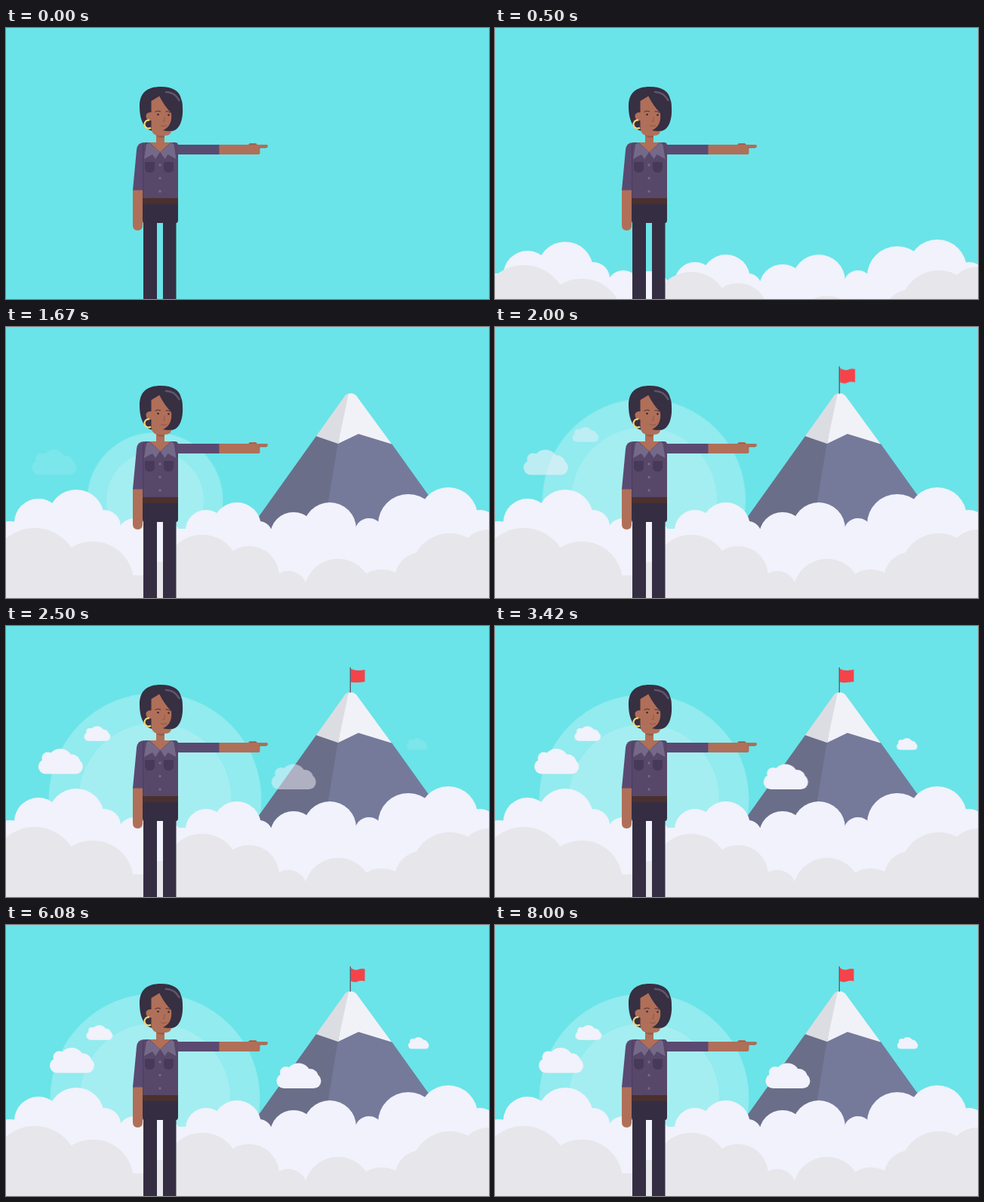
Animation, 640 px wide and 360 px high, one loop 8080 ms. Source, as an HTML page without scripts:

```html
<!DOCTYPE html>
<html lang="en">
<head>
<meta charset="utf-8">
<title>Pointing at the summit</title>
<style>
  html, body { margin: 0; width: 100%; height: 100%; overflow: hidden; background: #6ae4e8; }
  svg { display: block; width: 640px; height: 360px; }

  .sun, .mountain, .flag, .bank, .drift, .fade {
    animation: 8.08s linear infinite both;
  }

  .sun { transform-origin: 197.5px 230px; animation-name: sun; }
  @keyframes sun {
    0%, 17.6% { transform: scale(0); }
    20.67% { transform: scale(.646); animation-timing-function: ease-out; }
    26.6% { transform: scale(1.02); }
    30.94% { transform: scale(1.014); animation-timing-function: ease-out; }
    38.4%, 100% { transform: none; }
  }

  .mountain { animation-name: mountain; }
  @keyframes mountain {
    0%, 7.2% { transform: translateY(291px); animation-timing-function: cubic-bezier(.215, .61, .355, 1); }
    17.45%, 100% { transform: none; }
  }

  .flag { transform-origin: 456px 88px; animation-name: flag; }
  @keyframes flag {
    0%, 21.2% { transform: scale(0); animation-timing-function: ease-out; }
    25% { transform: scale(1.09); animation-timing-function: ease-in-out; }
    28.8%, 100% { transform: none; }
  }

  .bank { animation-name: rise; }
  .front { animation-name: rise-front; }
  @keyframes rise {
    0%, 4.9% { transform: translateY(150px); animation-timing-function: cubic-bezier(.215, .61, .355, 1); }
    10.8%, 100% { transform: none; }
  }
  @keyframes rise-front {
    0%, 4.9% { transform: translateY(100px); animation-timing-function: cubic-bezier(.215, .61, .355, 1); }
    11.2%, 100% { transform: none; }
  }

  .drift { animation-name: drift; }
  @keyframes drift {
    0%, 19.55% { transform: translateX(var(--from)); }
    49.5%, 100% { transform: none; }
  }

  .fade { animation-name: var(--fade); }
  @keyframes fade-left { 0%, 19.55% { opacity: 0; } 28%, 100% { opacity: 1; } }
  @keyframes fade-small { 0%, 21.7% { opacity: 0; } 28.5%, 100% { opacity: 1; } }
  @keyframes fade-peak { 0%, 28.8% { opacity: 0; } 33%, 100% { opacity: 1; } }
  @keyframes fade-right { 0%, 29.9% { opacity: 0; } 37%, 100% { opacity: 1; } }

  .white { fill: #f1f2fb; }
  .grey { fill: #e6e6eb; }
  .skin { fill: #b06f58; }
  .hair { fill: #372f42; }
  .shirt { fill: #574768; }
  .sleeve { fill: #5a4a71; }
  .pants { fill: #352e43; }
  .collar { fill: #75698a; }
  .pocket { fill: #473a58; }
</style>
</head>
<body>
<svg viewBox="0 0 640 360">
  <defs>
    <g id="cloud" class="white">
      <rect y="14" width="59" height="19.500" rx="9.750"/>
      <circle cx="12.500" cy="12.500" r="8"/>
      <circle cx="29" cy="16.500" r="16.500"/>
      <circle cx="44" cy="19" r="11.500"/>
    </g>
    <path id="half-collar" class="collar" d="M186 155L183 174L194 168L198 174L204 165L189 152Z"/>
    <path id="pocket" class="pocket" d="M184 178H197V187Q196 192 190.500 192Q185 192 184 187Z"/>
  </defs>

  <rect width="640" height="360" fill="#6ae4e8"/>

  <g class="sun" fill="#fff">
    <circle cx="197.500" cy="230" r="139" fill-opacity=".27"/>
    <circle cx="197.500" cy="230" r="99.500" fill-opacity=".17"/>
  </g>

  <g class="mountain">
    <path fill="#6b6e89" d="M411 145L457 138L480 360H322V270Z"/>
    <path fill="#757a9b" d="M440 153L467 138L511 155L593 270V360H410L424 250Z"/>
    <path fill="#f1f2f8" d="M450 91Q457 85 464 91L511 155.500L467 142L440 155Z"/>
    <path fill="#dcdde2" d="M411 145L448 93Q450 89 454 88.500L440 155Z"/>
  </g>

  <g class="flag">
    <path stroke="#5b586a" stroke-width="1.300" d="M456.300 55V88.500"/>
    <path fill="#f5434a" d="M457 57Q462 61 467 59T475.500 58.500V74.500Q470 73 466 75T457 74.500Z">
      <animate attributeName="d" dur="1.010s" repeatCount="indefinite" values="
        M457 57Q462 61 467 59T475.500 58.500V74.500Q470 73 466 75T457 74.500Z;
        M457 57Q462 59 467 59T475.500 58V74Q470 75 466 75T457 74.500Z;
        M457 57Q462 61 467 59T475.500 58.500V74.500Q470 73 466 75T457 74.500Z"/>
    </path>
  </g>

  <g class="drift" style="--from: -24.5px">
    <g class="fade" style="--fade: fade-left"><use href="#cloud" x="58" y="163"/></g>
  </g>
  <g class="drift" style="--from: -4.8px">
    <g class="fade" style="--fade: fade-small"><use href="#cloud" transform="translate(106.500 133) scale(.59)"/></g>
  </g>
  <g class="drift" style="--from: -11px">
    <g class="fade" style="--fade: fade-peak"><use href="#cloud" x="358.500" y="183.500"/></g>
  </g>
  <g class="drift" style="--from: -3.2px">
    <g class="fade" style="--fade: fade-right"><use href="#cloud" transform="translate(533 149) scale(.465)"/></g>
  </g>

  <g class="bank white">
    <rect y="268" width="640" height="260"/>
    <circle cx="5" cy="288" r="30"/>
    <circle cx="43" cy="260" r="32"/>
    <circle cx="93" cy="253" r="37"/>
    <circle cx="130" cy="265" r="22"/>
    <circle cx="170" cy="276" r="22"/>
    <circle cx="204" cy="285" r="30"/>
    <circle cx="265" cy="270" r="27"/>
    <circle cx="306" cy="265" r="32"/>
    <circle cx="335" cy="276" r="18"/>
    <circle cx="381" cy="277" r="31"/>
    <circle cx="429" cy="268" r="35"/>
    <circle cx="481" cy="273" r="19"/>
    <circle cx="533" cy="262" r="40"/>
    <circle cx="586" cy="252" r="39"/>
    <circle cx="628" cy="268" r="25"/>
  </g>

  <g class="bank front grey">
    <rect y="345" width="640" height="150"/>
    <rect y="330" width="230" height="30"/>
    <rect x="520" y="325" width="120" height="35"/>
    <circle cx="38" cy="325" r="58"/>
    <circle cx="115" cy="339" r="54"/>
    <circle cx="206" cy="335" r="23"/>
    <circle cx="260" cy="326" r="50"/>
    <circle cx="322" cy="331" r="40"/>
    <circle cx="374" cy="349" r="25"/>
    <circle cx="440" cy="353" r="45"/>
    <circle cx="498" cy="362" r="40"/>
    <circle cx="551" cy="335" r="36"/>
    <circle cx="588" cy="325" r="51"/>
    <circle cx="640" cy="310" r="41"/>
  </g>

  <g class="woman">
    <path class="pants" d="M181 232H228V255Q228 259 225.500 259V360H208V259H200V360H182V259Q181 258 181 255Z"/>

    <rect class="sleeve" x="222" y="155" width="61" height="13"/>
    <path class="skin" d="M282.500 155H321L323 153H331L333 155H345.500Q347 155 347 157T345.500 159H336.500V166Q336.500 168 334.500 168H282.500Z"/>
    <path fill="none" stroke="#8f5949" stroke-width=".8" d="M322 154.500H332M335 159H345"/>

    <path class="skin" d="M168 214H181V262Q181 269 174.500 269T168 262Z"/>
    <path class="sleeve" d="M183 152Q174 152 173 162L168 215.500H181.500Z"/>
    <path class="shirt" d="M181 156Q181 152 185 152H224Q228 152 228 156V227H181Z"/>
    <path fill="none" stroke="#483c5e" stroke-width=".8" d="M181.500 155V226"/>
    <rect x="181" y="226" width="47" height="8" fill="#4a302f"/>

    <use href="#half-collar"/>
    <use href="#half-collar" transform="matrix(-1 0 0 1 408.500 0)"/>
    <path class="skin" d="M190 152H199V138H210V152H218.500L204.250 165Z"/>
    <path fill="#965c4b" d="M199 141H210V145Q204 147 199 143Z"/>
    <use href="#pocket"/>
    <use href="#pocket" x="25"/>
    <g class="collar">
      <circle cx="204" cy="182" r="1.700"/>
      <circle cx="204" cy="199.500" r="1.700"/>
      <circle cx="204" cy="217" r="1.700"/>
    </g>

    <path class="hair" d="M196 137C183 136 177 122 177 104C177 86 187 78 205 78C221 78 230 84 232 94Q234 98 234 106C235 122 230 136 219 137Z"/>
    <path class="skin" d="M192.500 97L204 90L220 110V133Q220 143 210 143H203Q193 143 192.500 132V123Q186 123 185.500 117.500T192.500 112Z"/>
    <path class="hair" d="M203 90Q210 104 219 113Q221 130 208 136Q222 139 228 132L231 105L217 86Z"/>
    <path fill="none" stroke="#5f556f" stroke-width="2.600" stroke-linecap="round" d="M212 85Q223 85 229.500 96"/>

    <g fill="none" stroke="#4b3035" stroke-width="1">
      <path d="M197.500 111.500Q201 109 205 111M211.500 111Q215 110 218 112.500"/>
      <path stroke="#8f5949" d="M210 118V124H207.500M205 129.500Q209 131.500 213 129.500"/>
    </g>
    <g fill="#392733">
      <circle cx="201.500" cy="115" r="1.300"/>
      <circle cx="215.500" cy="115.500" r="1.300"/>
    </g>
    <path fill="none" stroke="#f6d776" stroke-width="2.200" d="M190 122.500A5.500 5.500 0 1 0 192 132.500"/>
  </g>
</svg>
</body>
</html>
```
